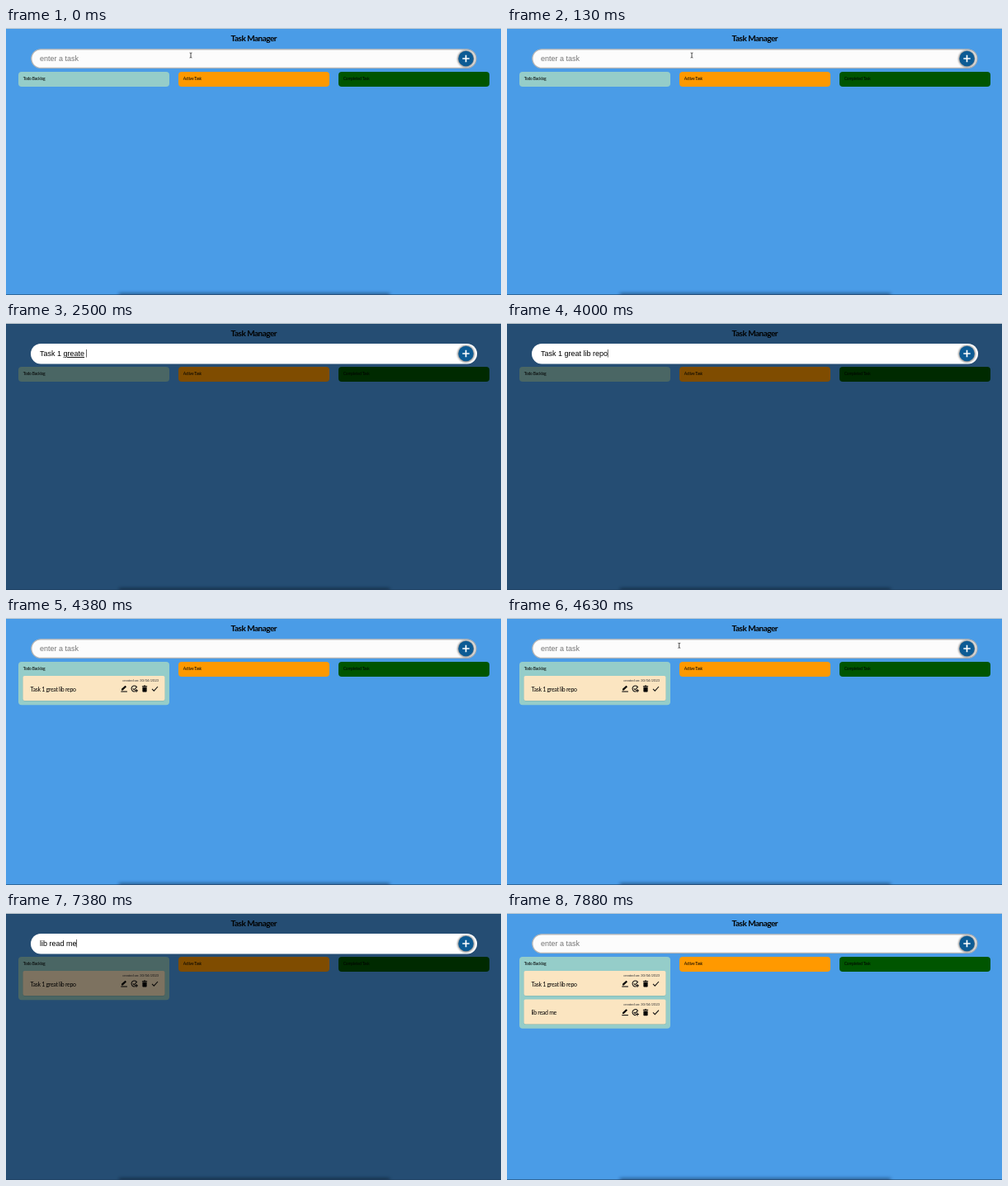
An HTML page that plays this animation: 600 px wide and 323 px high, repeating every 8 s.

```html
<!DOCTYPE html>
<html lang="en">
<head>
<meta charset="utf-8">
<title>Task Manager</title>
<style>
  html, body { margin: 0; width: 100%; height: 100%; overflow: hidden; background: #4a9ce7; }
  svg { display: block; width: 100vw; height: 100vh; }
  text { font-family: Lato, "Open Sans", sans-serif; white-space: pre; }
  .title { font-size: 10px; font-weight: 700; letter-spacing: -.5px; text-anchor: middle; }
  .head { font-size: 5px; letter-spacing: -.22px; }
  .task { font-size: 7px; letter-spacing: -.3px; }
  .date { font-size: 4.5px; letter-spacing: -.2px; text-anchor: end; fill: #3d3d3d; }
  .field { font-family: "Liberation Sans", Arial, sans-serif; font-size: 9px; }
  .typo { text-decoration: underline; text-decoration-thickness: .6px; text-underline-offset: 1px; }
  .line { fill: none; stroke: #111; stroke-width: 1.1; }
</style>
</head>
<body>
<svg viewBox="0 0 600 323" preserveAspectRatio="none">
  <defs>
    <filter id="soft" x="-20%" y="-300%" width="140%" height="700%"><feGaussianBlur stdDeviation="2.2"/></filter>
    <filter id="glow" x="-30%" y="-30%" width="160%" height="160%"><feGaussianBlur stdDeviation=".8"/></filter>
    <g id="icons">
      <path d="M-3 1.8V.2L1.5-3.9 3-2.4-1.4 1.8Z"/>
      <path class="line" d="M-3.7 3.4H3.9"/>
      <g transform="translate(12.5)">
        <path class="line" d="M2.6-2.5A3.5 3.5 0 1 0 .8 3.3M-1.7-.2-.3 1.2 3.4-2.4M2.5.4v3.8M.6 2.3h3.8"/>
      </g>
      <g transform="translate(25)">
        <path d="M-3.1-3.4h1.8l.6-.6H.7l.6.6h1.8v1h-6.2ZM-2.6-1.8h5.2v5q0 .8-.8.8h-3.6q-.8 0-.8-.8Z"/>
      </g>
      <path class="line" d="M34 .2 36.3 2.5 41-2.6"/>
    </g>
  </defs>

  <rect width="600" height="323" fill="#4a9ce7"/>
  <text class="title" x="300.3" y="15.5">Task Manager</text>
  <g id="columns"></g>
  <g id="cards"></g>
  <rect x="137" y="321" width="328" height="4" fill="#0a2440" opacity=".6" filter="url(#soft)"/>
  <rect id="shade" width="600" height="323" opacity=".5"/>
  <rect width="600" height="1" fill="#c4cdd3"/>
  <rect y="322" width="600" height="1" fill="#1d3c5c" opacity=".55"/>

  <rect id="box"/>
  <text id="entry" class="field" x="41" y="40"></text>
  <rect id="caret" y="32" width=".7" height="9.5" fill="#222"/>
  <circle cx="557.5" cy="37.2" r="10.2" fill="#555" opacity=".75" filter="url(#glow)"/>
  <circle cx="557.5" cy="37" r="9.2" fill="#0d5b94"/>
  <path d="M553.3 37h8.4M557.5 32.8v8.4" stroke="#fff" stroke-width="1.7"/>
  <path id="mouse" d="M-1.4-3Q0-3 0-2.2 0-3 1.4-3M0-2.2V2.2M-1.4 3Q0 3 0 2.2 0 3 1.4 3" fill="none" stroke="#222" stroke-width=".8"/>
</svg>
<script>
const LOOP = 8000, TICK = 125;
const $ = id => document.getElementById(id);

// Keys go down one per tick: "." waits, "<" deletes.
const sessions = [
  { focus: 2, start: 5, submit: 34, keys: "Task .1. greate << lib repo" },
  { focus: 41, start: 45, submit: 61, keys: "lib .read me" }
];

function press(keys) {
  let text = "";
  for (const key of keys) {
    if (key === "<") text = text.slice(0, -1);
    else if (key !== ".") text += key;
  }
  return text;
}

function set(el, attrs) {
  for (const name in attrs) el.setAttribute(name, attrs[name]);
}

function column(x, label, fill, height) {
  return `<rect x="${x}" y="53" width="183" height="${height}" rx="4" fill="${fill}"/>
    <text class="head" x="${x + 5.8}" y="63.4">${label}</text>`;
}

function card(label, index) {
  return `<g transform="translate(0 ${index * 34.6})">
    <rect x="20.5" y="70.5" width="172" height="30" rx="2" fill="#5f8f8c" opacity=".5"/>
    <rect x="20.5" y="70" width="172" height="30" rx="2" fill="#fbe5c1"/>
    <text class="date" x="185" y="77">created on: 30/04/2023</text>
    <text class="task" x="29.5" y="88.7">${label}</text>
    <use href="#icons" x="143" y="85.6"/></g>`;
}

let shownCount = -1;
function drawBoard(tasks) {
  if (tasks.length === shownCount) return;
  shownCount = tasks.length;
  const height = shownCount ? 17.6 + 34.6 * shownCount : 18;
  $("columns").innerHTML = column(15, "Todo Backlog", "#95cdc9", height)
    + column(209, "Active Task", "#ff9900", 18)
    + column(403, "Completed Task", "#005500", 18);
  $("cards").innerHTML = tasks.map(card).join("");
}

function drawField(tick, time, session) {
  const focused = Boolean(session);
  const count = focused ? Math.max(0, tick - session.start + 1) : 0;
  const text = focused ? press(session.keys.slice(0, count)) : "";
  const entry = $("entry");
  entry.textContent = text || "enter a task";
  entry.setAttribute("fill", text ? "#000" : "#757575");
  const width = text ? entry.getComputedTextLength() : 0;
  if (text.endsWith("greate ")) {
    entry.innerHTML = text.replace("greate", '<tspan class="typo">greate</tspan>');
  }

  $("shade").style.display = focused ? "" : "none";
  set($("box"), focused
    ? { x: 30, y: 25, width: 541, height: 24.5, rx: 12.2, fill: "#fff", stroke: "none" }
    : { x: 30.8, y: 25.8, width: 539, height: 22.6, rx: 11.3, fill: "#fcfcfc", stroke: "#b5b5b5", "stroke-width": 1.3 });

  let lit = false;
  if (focused) {
    const lastKey = session.start + Math.min(count, session.keys.length) - 1;
    const since = time - TICK * (count ? lastKey : session.focus);
    lit = since % 1000 < 500;
  }
  $("caret").style.display = lit ? "" : "none";
  $("caret").setAttribute("x", 40.8 + width);
}

function drawMouse(time) {
  const visible = time < 625 || (time >= 4500 && time < 5625);
  const p = Math.min(1, Math.max(0, (time - 4500) / 600));
  const ease = p * p * (3 - 2 * p);
  $("mouse").style.display = visible ? "" : "none";
  $("mouse").setAttribute("transform", `translate(${224 - 125 * ease} ${33 + 2.5 * ease})`);
}

function draw(time) {
  const tick = Math.floor(time / TICK);
  const done = sessions.filter(s => tick >= s.submit);
  drawBoard(done.map(s => press(s.keys)));
  drawField(tick, time, sessions.find(s => tick >= s.focus && tick < s.submit));
  drawMouse(time);
}

const begin = performance.now();
function frame() {
  draw((performance.now() - begin) % LOOP);
  requestAnimationFrame(frame);
}
frame();
</script>
</body>
</html>
```
